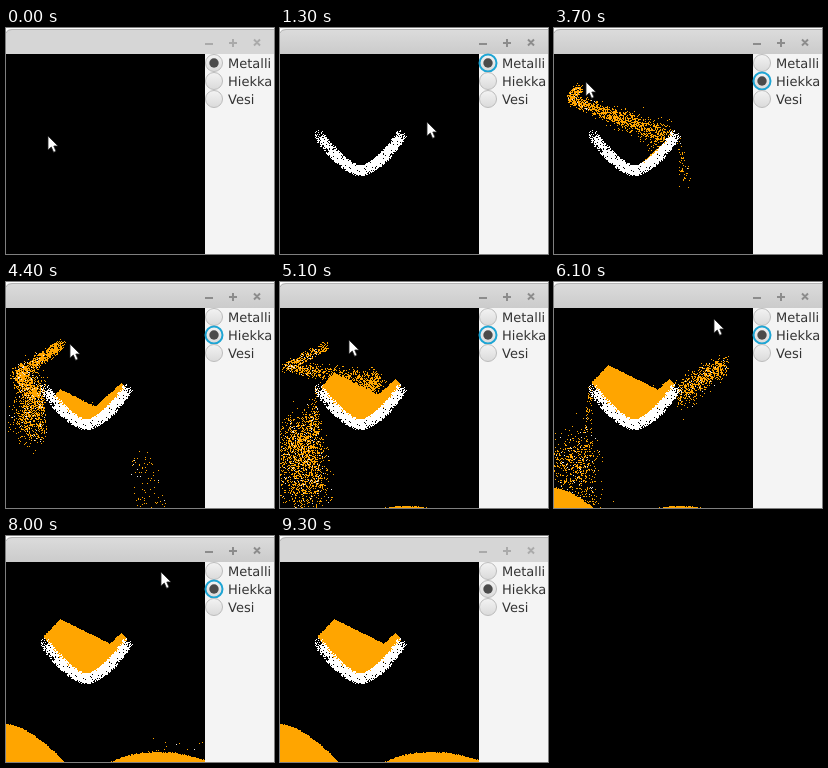
An HTML page with a canvas for the animation above (9.5 s loop, 268 by 226 pixels).

```html
<!DOCTYPE html>
<html lang="fi">
<head>
<meta charset="utf-8">
<title>Hiekka</title>
<style>
  html, body { margin: 0; width: 100%; height: 100%; overflow: hidden; background: #fff; }
  #stage { position: relative; width: 268px; height: 226px; overflow: hidden; }
  canvas, svg { position: absolute; left: 0; top: 0; display: block; }
  canvas { image-rendering: pixelated; }
  text { font: 13px "DejaVu Sans", sans-serif; fill: #333; text-rendering: geometricPrecision; }
</style>
</head>
<body>
<div id="stage">
  <canvas id="sand" width="268" height="226"></canvas>
  <svg width="268" height="226">
    <defs>
      <linearGradient id="bar" x2="0" y2="1">
        <stop stop-color="#dcdcdc"/><stop offset="1" stop-color="#cbcbcb"/>
      </linearGradient>
      <linearGradient id="knob" x2="0" y2="1">
        <stop stop-color="#f3f3f3"/><stop offset="1" stop-color="#dadada"/>
      </linearGradient>
    </defs>
    <rect width="268" height="26" fill="#fff"/>
    <path id="title" d="M0 26V5Q1 1 6 1H268V26Z"/>
    <path d="M0 5Q1 1.5 6 1.500H268" fill="none" stroke="#b4b4b4"/>
    <path id="icons" d="M199 16h8M223 15h8M227 11v8M248 11.500l6 6M254 11.500l-6 6" fill="none" stroke-width="2"/>
    <rect x="199" y="26" width="69" height="200" fill="#f4f4f4"/>
    <g id="radios"></g>
    <path id="cursor" d="M0 0V14L3.300 11L5.600 16.300L8 15.300L5.800 10H10Z" fill="#fff" stroke="#222" stroke-width=".8"/>
  </svg>
</div>
<script>
const LOOP = 9500, STEP = 100, W = 199, TOP = 26, FLOOR = 226;
const ORANGE = '#ffa500';
const METAL = { from: 100, to: 1050, left: 38, right: 121 };
const POUR = { from: 3120, to: 5830 };
const $ = id => document.getElementById(id);
const ctx = $('sand').getContext('2d');

let seed = 7;
function rnd() {
  seed = (seed * 1664525 + 1013904223) >>> 0;
  return seed / 4294967296;
}
const mix = (a, b, k) => a + (b - a) * k;
const between = (a, b) => mix(a, b, rnd());
const bell = () => rnd() + rnd() + rnd() + rnd() - 2;
const progress = (t, from, to) => Math.min(1, Math.max(0, (t - from) / (to - from)));
const repeat = (n, make) => Array.from({ length: n }, make);

function inDisc(radius) {
  const a = rnd() * 2 * Math.PI, r = radius * Math.sqrt(rnd());
  return [r * Math.cos(a), r * Math.sin(a)];
}

const bowlY = x => 142 - 37 * Math.abs((x - 80) / 42) ** 1.7;

// Where the pointer heads after drawing the bowl.
const stops = [
  { t: METAL.to, x: METAL.right, y: 109 },
  { t: 1300, x: 147, y: 94 },
  { t: 1900, x: 232, y: 46 },
  { t: 2400, x: 209, y: 57 },
  { t: 3000, x: 95, y: 58 },
  { t: 3100, x: 112, y: 57 },
  { t: 3560, x: 16, y: 64 },
  { t: 3700, x: 32, y: 54 },
  { t: 4000, x: 12, y: 61 },
  { t: 4650, x: 97, y: 62 },
  { t: 4910, x: 6, y: 73 },
  { t: 5100, x: 69, y: 58 },
  { t: 5800, x: 176, y: 56 },
  { t: 6100, x: 160, y: 37 },
  { t: 6800, x: 155, y: 36 },
  { t: 8300, x: 155, y: 36 },
  { t: 8900, x: 136, y: -20 }
];
function pointer(t) {
  if (t < METAL.from) return [42, 108];
  if (t < METAL.to) {
    const x = mix(METAL.left, METAL.right, progress(t, METAL.from, METAL.to));
    return [x, bowlY(x)];
  }
  const i = stops.findIndex(s => s.t > t);
  if (i < 0) return [136, -20];
  const a = stops[i - 1], b = stops[i], k = progress(t, a.t, b.t);
  return [mix(a.x, b.x, k), mix(a.y, b.y, k)];
}

// A heap falls away from its peak on each side and rises by `rise` over time.
const bowlHeaps = [
  { x: 54, y: 83, left: 1.05, right: .5, power: 1, from: 3700, to: 6000, rise: 50, ease: 2 },
  { x: 115, y: 97, left: .9, right: 1, power: 1, from: 3300, to: 5300, rise: 20, ease: 2 }
];
const floorHeaps = [
  { x: 0, y: 188, left: 0, right: .057, power: 1.6, from: 5100, to: 7000, rise: 38, ease: 1 },
  { x: 126, y: 224, left: .004, right: .004, power: 2, from: 4600, to: 5100, rise: 3, ease: 1 },
  { x: 150, y: 216, left: .0047, right: .0035, power: 2, from: 6800, to: 7900, rise: 10, ease: 1 }
];
function heapTop(h, x, t) {
  if (t < h.from) return FLOOR;
  const slope = x < h.x ? h.left : h.right;
  const missing = h.rise * (1 - progress(t, h.from, h.to)) ** h.ease;
  return h.y + slope * Math.abs(x - h.x) ** h.power + missing;
}
const surface = (heaps, base, x, t) => heaps.reduce((y, h) => Math.min(y, heapTop(h, x, t)), base);
const bowlTop = (x, t) => surface(bowlHeaps, bowlY(x) - 3, x, t);
const floorTop = (x, t) => surface(floorHeaps, FLOOR, x, t);

const metal = repeat(2600, () => {
  const t = mix(METAL.from, METAL.to, rnd() ** .85);
  const [x, y] = pointer(t), [dx, dy] = inDisc(5.5);
  return { t, x: Math.round(x + dx), y: Math.round(y + dy) };
});

function grain(t, x, y, vx, vy, spilled) {
  const rimX = x + vx * Math.max(0, 104 - y) / vy;
  const free = spilled || rimX < 37 || rimX > 123;
  const color = free && rnd() < .08 ? '#e8e8e8' : ORANGE;
  return { t, x, y, vx, vy, rimX, free, color };
}
const poured = repeat(6500, () => {
  const t = between(POUR.from, POUR.to);
  const [x, y] = pointer(t - 70), [dx, dy] = inDisc(5);
  return grain(t, x + dx, y + dy, bell() * 15, 97 + bell() * 22);
});
const spill = (n, from, to, x, y, slow, fast, vy) => repeat(n, () =>
  grain(between(from, to), x + bell() * 2, y + bell() * 3, between(slow, fast), vy + bell() * 12, true));
const grains = [
  ...poured,
  ...spill(90, 3300, 3900, 124, 111, 2, 38, 115),
  ...spill(330, 3900, 6750, 36, 104, -15, 4, 100)
];

function dot(x, y, color) {
  ctx.fillStyle = color;
  ctx.fillRect(x, y, 1, 1);
}

function drawGrain(g, t) {
  const age = (t - g.t) / 1000;
  const y = Math.round(g.y + g.vy * age);
  if (age < 0 || y >= FLOOR) return;
  let x = Math.abs(Math.round(g.x + g.vx * age));
  if (x >= W) x = 2 * W - 2 - x;
  const ground = g.free ? floorTop(x, t) : bowlTop(g.rimX, t);
  if (y < ground) dot(x, y, g.color);
}

function fillColumns(from, to, top, bottom, t) {
  ctx.fillStyle = ORANGE;
  for (let x = from; x < to; x++) {
    const y = Math.round(top(x, t) + .5 * Math.sin(x * x));
    const height = Math.round(bottom(x)) - y;
    if (height > 0) ctx.fillRect(x, y, 1, height);
  }
}

function drawSand(t) {
  ctx.fillStyle = '#000';
  ctx.fillRect(0, TOP, W, FLOOR - TOP);
  for (const g of grains) drawGrain(g, t);
  if (t > bowlHeaps[1].from) fillColumns(38, 124, bowlTop, x => bowlY(x) - 3, t);
  fillColumns(0, W, floorTop, () => FLOOR, t);
  for (const m of metal) if (m.t <= t) dot(m.x, m.y, '#fff');
}

$('radios').innerHTML = ['Metalli', 'Hiekka', 'Vesi'].map((label, i) => {
  const y = 35 + 18 * i;
  return `<circle class="ring" cx="208" cy="${y}" r="8.500" fill="url(#knob)"/>
    <circle class="mark" cx="208" cy="${y}" r="4.700" fill="#4b4b4b"/>
    <text x="222" y="${y + 5}">${label}</text>`;
}).join('');
const parts = name => [...document.querySelectorAll('.' + name)];
const rings = parts('ring'), marks = parts('mark');

function drawWindow(t) {
  const active = t >= 100 && t < 9300, chosen = t < 2400 ? 0 : 1;
  $('title').setAttribute('fill', active ? 'url(#bar)' : '#d6d6d6');
  $('icons').setAttribute('stroke', active ? '#8c8c8c' : '#aaa');
  rings.forEach((ring, i) => {
    const lit = active && i === chosen;
    ring.setAttribute('stroke', lit ? '#1ea5d4' : '#bcbcbc');
    ring.setAttribute('stroke-width', lit ? 2 : 1);
    marks[i].style.opacity = +(i === chosen);
  });
  const [x, y] = pointer(t);
  $('cursor').setAttribute('transform', `translate(${Math.round(x)} ${Math.round(y)})`);
}

let shown = -1;
function frame() {
  const t = Math.floor(performance.now() % LOOP / STEP) * STEP;
  if (t !== shown) {
    shown = t;
    drawSand(t);
    drawWindow(t);
  }
  requestAnimationFrame(frame);
}
frame();
</script>
</body>
</html>
```
